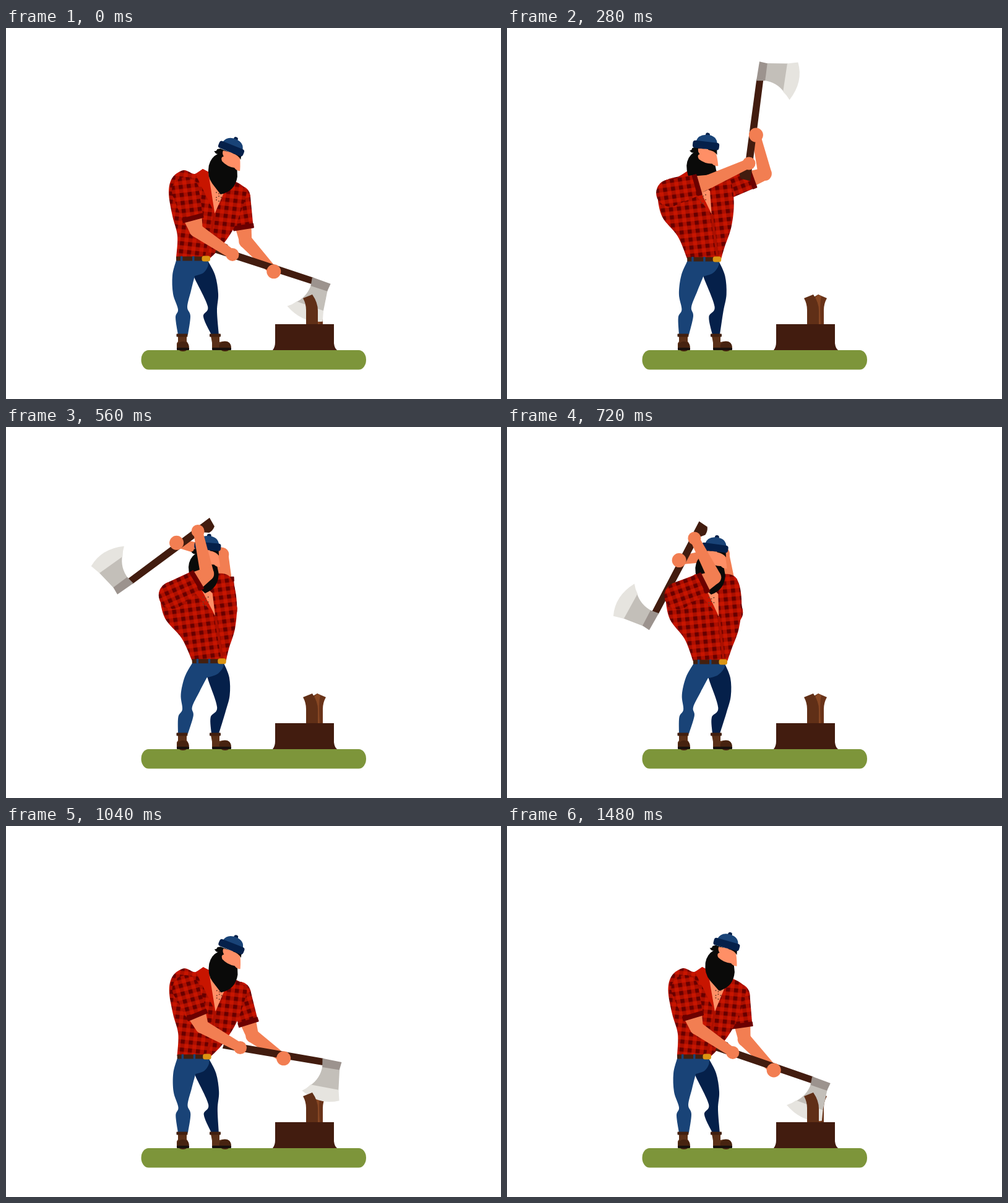
Animation, 800 px wide and 600 px high, one loop 1.52 s. Source, as an HTML page with a canvas:

```html
<!DOCTYPE html>
<html lang="en">
<head>
<meta charset="utf-8">
<title>Lumberjack</title>
<style>
html, body { margin: 0; width: 100%; height: 100%; overflow: hidden; background: #fff; }
canvas { display: block; width: 800px; height: 600px; }
</style>
</head>
<body>
<canvas id="stage" width="800" height="600"></canvas>
<script>
const ctx = document.getElementById('stage').getContext('2d');
const LOOP = 1520, STEP = 40, IMPACT = 1080, RAD = Math.PI / 180;
const SKIN = '#f27e52', FACE = '#ff8f66', SHIRT = '#c81500', CUFF = '#6c0000';
const NAVY = '#05204a', BLUE = '#194377', BLACK = '#0a0a09';
const BARK = '#421c0f', WOOD = '#602f17', BOOT = '#5b3018', BELT = '#43200f';

const clamp01 = v => Math.max(0, Math.min(1, v));
const ease = p => { p = clamp01(p); return p * p * (3 - 2 * p); };
const ramp = (t, from, to) => ease((t - from) / (to - from));
const add = (p, x, y) => [p[0] + x, p[1] + y];
const polar = (p, deg, r) => add(p, r * Math.cos(deg * RAD), r * Math.sin(deg * RAD));
const angleTo = (a, b) => Math.atan2(b[1] - a[1], b[0] - a[0]) / RAD;

// The axe angle and the lean follow time; every joint follows those two.
function poseAt(t) {
  const recoil = t > IMPACT ? Math.sin(Math.PI * (t - IMPACT) / (LOOP - IMPACT)) : 0;
  const lift = ease(t / 680 + 0.022 * Math.sin(2 * Math.PI * Math.min(t / 680, 1)));
  const strike = ramp(t, 710, IMPACT);
  const axe = 18 - 261 * (lift - strike) + 3 * recoil;
  const lean = -5 - 47 * (ramp(t, 0, 340) - ramp(t, 600, IMPACT)) - 9 * recoil;

  const swing = lift - strike;
  const behind = clamp01((-142 - axe) / 100);
  const hip = [323 + 26 * (1 - (1 - swing) ** 2), 373 + 7 * swing ** 2];
  const neck = [hip[0] + lean, 228 + 10 * swing];
  const turn = 22 + 0.36 * (lean + 5) - 20 * recoil;
  const hat = add(neck, 24 + turn, -45 + 0.55 * turn - 2 * swing);

  const upper = -30 + 78 * clamp01((axe + 140) / 158) ** 1.8 + 0.6 * (lean + 50);
  const shoulder = add(neck, -28, 35);
  const elbow = polar(shoulder, upper, 66);
  const hand = polar(elbow, 23.5 + 0.58 * axe, 71);
  const grip = 27 + 45 * ramp(axe, -128, -30) + 16 * behind;
  const farHand = polar(polar(hand, axe, grip), axe + 90, 5.5);

  const farUpper = Math.max(63 + axe, -80 + 0.18 * (axe + 142));
  const reach = Math.max(0, Math.cos(farUpper * RAD));
  const farShoulder = add(neck, 58, 49 - 22 * reach + 13 * behind);
  const farElbow = polar(farShoulder, farUpper, 72 + 24 * behind);
  return { axe, hip, neck, turn, hat, upper, shoulder, elbow, hand, farHand, farUpper, farShoulder, farElbow };
}

function poly(fill, ...pts) {
  ctx.beginPath();
  pts.forEach(p => ctx.lineTo(...p));
  ctx.fillStyle = fill;
  ctx.fill();
}

function disc(fill, p, rx, ry = rx) {
  ctx.beginPath();
  ctx.ellipse(p[0], p[1], rx, ry, 0, 0, 7);
  ctx.fillStyle = fill;
  ctx.fill();
}

function pill(fill, x, y, w, h, r) {
  ctx.beginPath();
  ctx.roundRect(x, y, w, h, r);
  ctx.fillStyle = fill;
  ctx.fill();
}

// Each chain is a smooth curve; chains are joined by straight lines.
function curves(fill, ...chains) {
  ctx.beginPath();
  for (const c of chains) {
    ctx.lineTo(...c[0]);
    for (let i = 0; i < c.length - 1; i++) {
      const a = c[i - 1] || c[i], p = c[i], q = c[i + 1], b = c[i + 2] || q;
      ctx.bezierCurveTo(p[0] + (q[0] - a[0]) / 6, p[1] + (q[1] - a[1]) / 6,
        q[0] - (b[0] - p[0]) / 6, q[1] - (b[1] - p[1]) / 6, q[0], q[1]);
    }
  }
  ctx.closePath();
  ctx.fillStyle = fill;
  ctx.fill();
}

function shape(fill, d) {
  ctx.fillStyle = fill;
  ctx.fill(new Path2D(d));
}

function taper(fill, a, ra, b, rb, round = true) {
  const k = angleTo(a, b);
  poly(fill, polar(a, k - 90, ra), polar(b, k - 90, rb), polar(b, k + 90, rb), polar(a, k + 90, ra));
  if (round) disc(fill, a, ra);
}

function placed(p, deg, draw) {
  ctx.save();
  ctx.translate(...p);
  ctx.rotate(deg * RAD);
  draw();
  ctx.restore();
}

const cloth = (() => {
  const tile = document.createElement('canvas');
  tile.width = tile.height = 13;
  const g = tile.getContext('2d');
  const box = (color, x, y, w, h) => { g.fillStyle = color; g.fillRect(x, y, w, h); };
  box(SHIRT, 0, 0, 13, 13);
  box('#ac0f00', 0, 3, 13, 6.5);
  box('#ac0f00', 3, 0, 6.5, 13);
  box('#680000', 3, 3, 6.5, 6.5);
  return ctx.createPattern(tile, 'repeat');
})();

function plaid(p, deg) {
  cloth.setTransform(new DOMMatrix().translate(...p).rotate(deg));
  return cloth;
}

function ground() {
  pill('#7d953a', 218.5, 521, 363.5, 31.5, { x: 12, y: 15.7 });
  shape(BARK, 'M435 479H530V510Q531 518 535 521H431Q435 516 435 508Z');
}

function logBack() {
  shape('#693319', 'M496 435L503 431L517 437Q512 446 512 456V479H496Z');
  shape('#874723', 'M498 436L503 431L508 434Q505 444 507 479H502Z');
}

function logFront() {
  shape(WOOD, 'M480 437L495 431Q504 444 504 457V479H485V456Q485 446 480 437Z');
}

// The feet stay put; the higher a point, the more it follows the hip.
function legs(hip) {
  const bend = (power, pts) => pts.map(([x, y]) => {
    const w = Math.max(0, (495 - y) / 118) ** power;
    return [x + (hip[0] - 323) * w, y + (hip[1] - 373) * w];
  });
  curves(NAVY,
    bend(0.55, [[326, 376], [338, 400], [343, 430], [341, 458], [344, 496]]),
    bend(0.55, [[332, 496], [319, 467], [326, 450], [304, 403], [300, 390]]));
  curves(BLUE,
    bend(1.2, [[275, 376], [269, 400], [270, 430], [278, 455], [274, 468], [278, 496]]),
    bend(1.2, [[294, 496], [298, 466], [293, 451], [299, 425], [305, 401]]),
    bend(1.2, [[305, 401], [319, 396], [326, 386], [327, 376]]));
}

function boots() {
  shape(BOOT, 'M278 498H292V507Q296 511 296 519H276V510L278 507Z');
  shape(BOOT, 'M331 498H345V508Q364 502 364 519H333V509Z');
  for (const x of [286, 354]) disc('#472310', [x, 515], 9.5, 8);
  for (const [x, w] of [[276, 20], [333, 31]]) pill('#18100d', x, 517, w, 4, 1);
  for (const x of [275.5, 329]) pill('#43200f', x, 494.5, 18, 5, 1);
}

function cuff(p, deg, half) {
  placed(p, deg, () => pill(CUFF, -4, -half, 8, half * 2, 1));
}

function farArm({ farShoulder, farElbow, farHand, farUpper }) {
  const wrist = polar(farShoulder, farUpper, 49);
  taper(SKIN, farElbow, 11, farHand, 7);
  taper(SKIN, wrist, 13, farElbow, 10, false);
  taper(plaid(farShoulder, farUpper), farShoulder, 19, wrist, 16);
  cuff(wrist, farUpper, 17);
}

function torso({ hip, neck, upper }) {
  const lean = neck[0] - hip[0];
  const lowered = clamp01((upper - 25) / 40), drop = 14 + 21 * lowered;
  const side = (x, y, k) => add(hip, x + lean * k, y);
  curves(plaid(neck, 8 + lean * 0.3),
    [side(-48, -1, 0), side(-44, -37, 0.4), side(-50, -69, 0.8), add(neck, -48 - 7 * lowered, 38),
      add(neck, -45 - 4 * lowered, 24 - 10 * lowered), add(neck, -31, 13 - 11 * lowered), add(neck, -13, 8), neck],
    [add(neck, 9, 5), add(neck, 54, drop - 14), add(neck, 70, drop), side(66, -92, 0.8),
      side(50, -53, 0.55), side(27, -20, 0.3), side(7, -1, 0)]);
  const notch = side(17, -73, 0.53);
  ctx.strokeStyle = '#ad1000';
  ctx.lineWidth = 4;
  ctx.beginPath();
  ctx.moveTo(...notch);
  ctx.lineTo(...add(hip, 1, -4));
  ctx.stroke();
  poly(SHIRT, add(neck, -12, 8), neck, add(neck, 10, 5), notch);
  poly(FACE, add(neck, 9, 6), notch, add(neck, 37, 32));
  for (let i = 0; i < 8; i++) {
    disc('#71402c', add(neck, 22 + i % 3 * 4, 38 + Math.floor(i / 3) * 6 + i % 2 * 2), 1);
  }
}

function belt([x, y]) {
  pill(BELT, x - 48, y - 3.5, 46, 7, 1);
  for (const dx of [-41, -22]) pill(BLUE, x + dx, y - 4, 3.5, 8, 1);
  pill('#db9412', x - 6.5, y - 4.5, 13.5, 9, 3.5);
}

function head({ hat, turn }) {
  placed(hat, turn * 0.6, () => {
    shape(BLACK, 'M-17 4L-22 6Q-22 10 -26 10Q-22 15 -19 13Q-29 21 -29 35Q-28 53 -17 62L0 76Q22 66 20 42L16 27L13 8Z');
    shape(FACE, 'M-12 6H15Q20 18 22 32Q16 33 12 29Q0 30 -10 23Q-14 17 -9 15Q-13 11 -12 6Z');
    shape(BLACK, 'M4 4H18L19 14Q14 8 4 7Z');
  });
  placed(hat, turn, () => {
    disc(NAVY, [1, -17], 3.5);
    shape(BLUE, 'M-17 -4Q-14 -17 1 -17Q16 -17 18 -4Z');
    pill(NAVY, -21.5, -6, 43, 12, 4);
  });
}

function axe(hand, deg) {
  placed(hand, deg, () => {
    shape(BARK, 'M-28 6L-26 -10Q-20 -14 -13 -13L-5 -6L136 -5V6Z');
    shape('#c3bfb9', 'M136 7H164L168 42H121Q136 28 136 7Z');
    shape('#e6e4df', 'M168 41L172 58Q142 71 110 52Q117 47 122 40Z');
    shape('#9c938e', 'M134 -5L165.5 -4L164 9H136Z');
  });
}

function nearArm({ shoulder, elbow, hand, upper }) {
  const wrist = polar(shoulder, upper, 46);
  taper(SKIN, wrist, 15, elbow, 11, false);
  taper(SKIN, elbow, 11, hand, 7.5);
  disc(SKIN, hand, 10.5);
  taper(plaid(shoulder, upper - 82), shoulder, 22, wrist, 17);
  cuff(wrist, upper, 17.5);
}

function chips(t) {
  const age = (t - IMPACT) / 120;
  if (age <= 0 || age > 1.4) return;
  for (const [dx, dy, deg] of [[-60, -27, 0], [67, -2, 68], [75, 26, 1]]) {
    placed([500 + dx * age, 445 + dy * age], deg + (age - 1) * 90, () =>
      poly('#5c2b14', [-10, 0], [10, -2], [-2, 3]));
  }
}

function draw(t) {
  const pose = poseAt(t);
  ctx.fillStyle = '#fff';
  ctx.fillRect(0, 0, 800, 600);
  ctx.save();
  if (t === IMPACT + STEP) ctx.translate(-3, 4); // jolt right after the blow
  ground();
  logBack();
  legs(pose.hip);
  boots();
  farArm(pose);
  torso(pose);
  belt(pose.hip);
  head(pose);
  axe(pose.hand, pose.axe);
  disc(SKIN, pose.farHand, 11.5);
  nearArm(pose);
  logFront();
  chips(t);
  ctx.restore();
}

function tick() {
  draw(Math.floor(performance.now() % LOOP / STEP + 0.01) * STEP % LOOP);
  requestAnimationFrame(tick);
}
tick();
</script>
</body>
</html>
```
